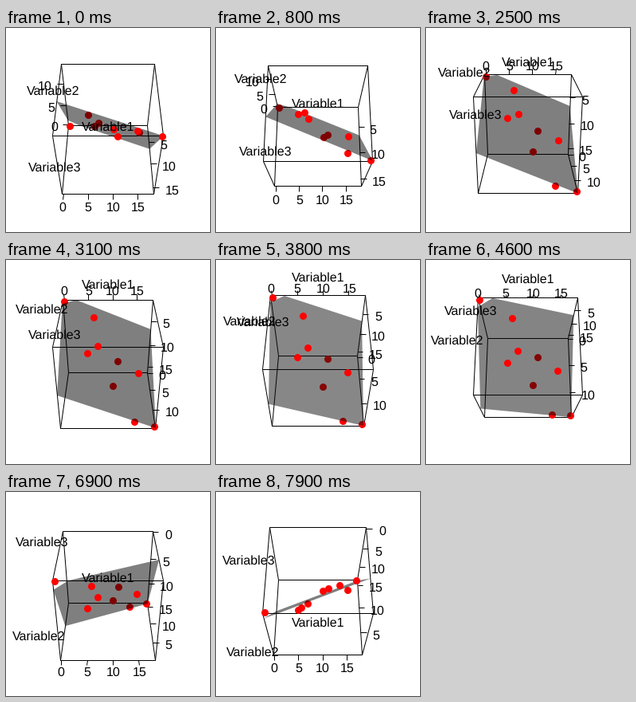
These frames come from a looping animation (256 by 256 pixels, 8 s). A matplotlib script:

```python
from itertools import product

import matplotlib.pyplot as plt
import numpy as np
from matplotlib.animation import FuncAnimation

plt.rcParams["text.hinting"] = "none"

SIZE, DPI = 256, 64
PT = 72 / DPI                                     # points per pixel
FOCAL = SIZE / 2 / np.tan(np.radians(15))         # 30 degree field of view
EYE = 8.236
FRAMES, STEP = 80, 100
START, TURN = 40.4, -2.4                          # degrees, degrees per frame
TICK, LABEL, TITLE = 1 + 2 / 15, 1 + 4 / 15, 1.3

DATA = np.array([
    (0, 0, 1), (6, 2, 3), (7, 6, 6), (5, 8, 6), (11, 6, 9),
    (15, 8, 10), (10, 10, 11), (14, 14, 15), (18, 14, 16),
], float)
LOW, HIGH = DATA.min(0), DATA.max(0)


def to_box(value, axis):
    """Data value to box coordinate; the box is 3% wider than the data."""
    return (2 * (value - LOW[axis]) / (HIGH[axis] - LOW[axis]) - 1) / 1.03


POINTS = np.column_stack([to_box(DATA[:, k], k) for k in range(3)])

# Regression plane q = A + B*x + C*p, cut off by the box
(A, B, C), *_ = np.linalg.lstsq(
    np.column_stack([np.ones(len(POINTS)), POINTS[:, :2]]), POINTS[:, 2], rcond=None)


def height(x, p):
    return A + B * x + C * p


OUTLINE = [(-1, (-1 - A + B) / C), ((-1 - A + C) / B, -1), (1, -1), (1, 1), (-1, 1)]
PLANE = np.array([(x, p, height(x, p)) for x, p in OUTLINE])
NORMAL = np.array([B, C, -1]) / np.sqrt(B * B + C * C + 1)

CORNERS = list(product((-1, 1), repeat=3))
EDGES = [(a, b) for a in CORNERS for b in CORNERS
         if a < b and sum(i != j for i, j in zip(a, b)) == 1]

fig = plt.figure(figsize=(SIZE / DPI, SIZE / DPI), dpi=DPI, facecolor="white")
ax = fig.add_axes([0, 0, 1, 1])


def project(pos, angle):
    x, p, q = np.asarray(pos, float).T
    c, s = np.cos(angle), np.sin(angle)
    scale = FOCAL / (EYE - p * c - q * s)
    return SIZE / 2 + x * scale, SIZE / 2 - (p * s - q * c) * scale


def line(a, b, angle):
    # Pixel centres keep level lines crisp
    x, y = np.floor(project([a, b], angle)) + 0.5
    ax.plot(x, y, color="black", lw=PT, snap=False,
            solid_capstyle="butt", zorder=1)


def dots(pos, angle, z):
    ax.scatter(*project(pos, angle), s=(9 * PT) ** 2, color="red", lw=0, zorder=z)


def text(pos, label, angle, align="center"):
    x, y = project(pos, angle)
    ax.text(x, y + 7.8, label, fontsize=16 * PT, family="Liberation Sans",
            ha=align, va="baseline", color="black", zorder=5)


def ticks(axis, values, edge, out, angle, align):
    """Ticks along one box edge, pointing outwards along axis `out`."""
    for value in values:
        spots = []
        for reach in (1, TICK, LABEL):
            spot = list(edge)
            spot[axis] = to_box(value, axis)
            spot[out] *= reach
            spots.append(spot)
        line(spots[0], spots[1], angle)
        text(spots[2], str(value), angle, align)


def draw(i):
    ax.clear()
    ax.set(xlim=(0, SIZE), ylim=(SIZE, 0))
    ax.axis("off")
    angle = np.radians(START + TURN * i)
    c, s = np.cos(angle), np.sin(angle)

    for a, b in EDGES:
        line(a, b, angle)

    # Axes sit on the outline of the box as it turns
    p_side = -1 if c > 0 else 1
    q_side = -1 if s > 0 else 1
    ticks(0, (0, 5, 10, 15), (0, p_side, -q_side), 2, angle, "center")
    ticks(1, (0, 5, 10), (q_side, 0, q_side), 0, angle,
          "left" if q_side > 0 else "right")
    ticks(2, (5, 10, 15), (1, p_side, 0), 0, angle, "left")

    text((0, -TITLE, -TITLE), "Variable1", angle)
    text((-TITLE, 0, -TITLE), "Variable2", angle)
    text((-TITLE, -TITLE, 0), "Variable3", angle)

    # Points behind the half-transparent plane are dimmed by it
    eye_side = EYE * s - height(0, EYE * c)
    front = (POINTS[:, 2] - height(POINTS[:, 0], POINTS[:, 1])) * eye_side > 0
    dots(POINTS[~front], angle, 2)
    shine = abs(NORMAL[1] * c + NORMAL[2] * s) ** 38
    ax.fill(*project(PLANE, angle), color=(shine,) * 3, alpha=0.5, lw=0, zorder=3)
    dots(POINTS[front], angle, 4)
    return []


anim = FuncAnimation(fig, draw, frames=FRAMES, interval=STEP, repeat=True,
                     repeat_delay=0, init_func=lambda: [])
plt.show()
```
